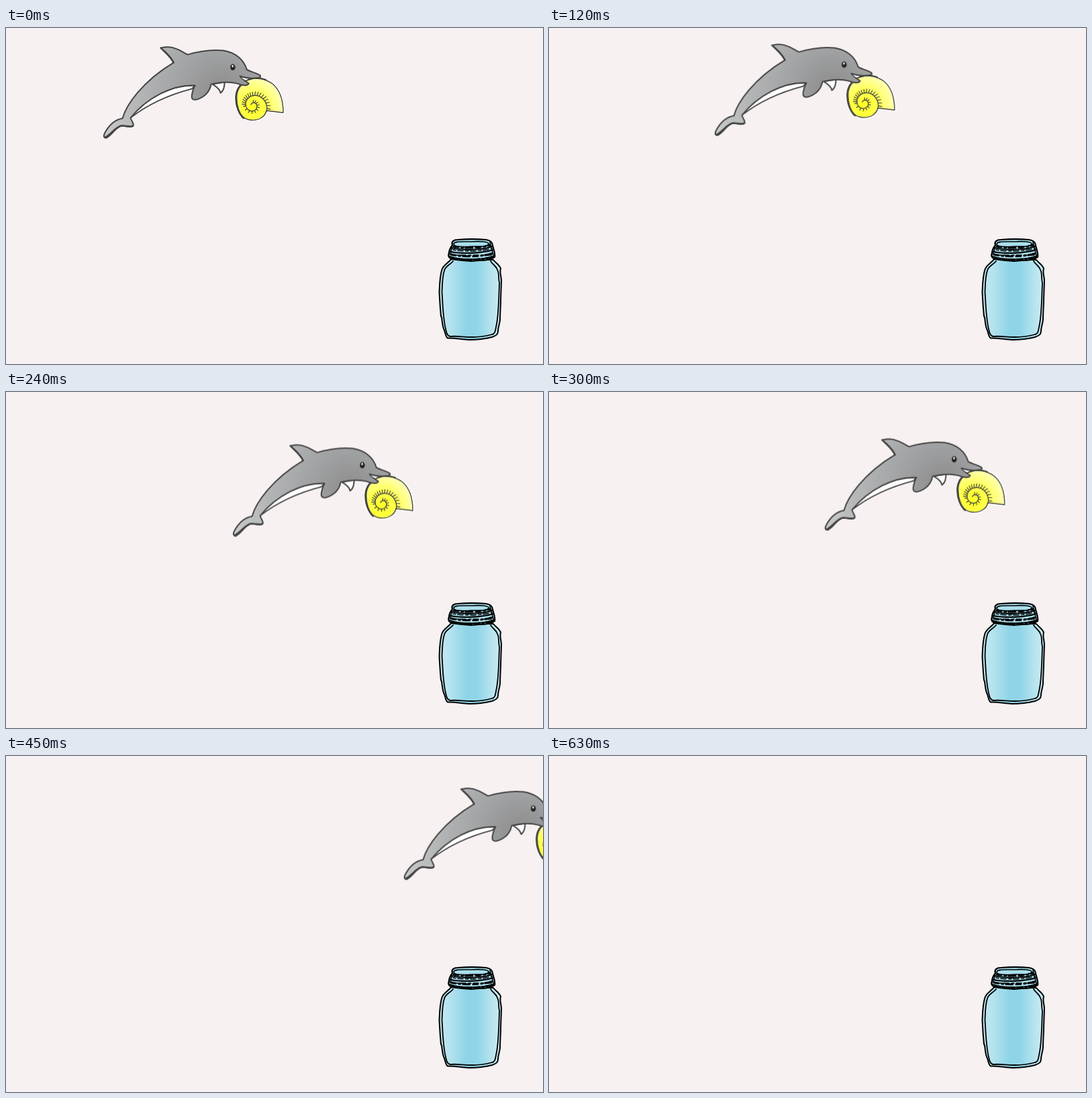
An HTML page for the animation above (690 ms loop, 800x500 px).

```html
<!DOCTYPE html>
<html lang="en">
<head>
<meta charset="utf-8">
<title>Dolphin and jar</title>
<style>
  html, body { margin: 0; width: 100%; height: 100%; overflow: hidden; background: #f7f1f1; }
  svg { display: block; width: 800px; height: 500px; }
  path, ellipse { stroke-linecap: round; stroke-linejoin: round; }
  .line { fill: none; }
  #swimmer { animation: swim 690ms infinite; }

  /* Three straight legs, one step every 30 ms, then a short pause */
  @keyframes swim {
    0%       { transform: translate(0, 0); animation-timing-function: steps(3, end); }
    13.0434% { transform: translate(79px, -17.5px); animation-timing-function: steps(5, end); }
    34.7826% { transform: translate(193px, 50.5px); animation-timing-function: steps(13, end); }
    91.3043%, 100% { transform: translate(666px, -6.5px); }
  }
</style>
</head>
<body>
<svg viewBox="0 0 800 500">
  <defs>
    <radialGradient id="skin" gradientUnits="userSpaceOnUse" cx="322" cy="98" r="190">
      <stop offset="0" stop-color="#8b8b8c"/>
      <stop offset=".3" stop-color="#9fa0a1"/>
      <stop offset=".6" stop-color="#b1b2b3"/>
      <stop offset="1" stop-color="#c9ccca"/>
    </radialGradient>
    <radialGradient id="shellFill" gradientUnits="userSpaceOnUse" cx="366" cy="120" r="56">
      <stop offset="0" stop-color="#ffff24"/>
      <stop offset=".4" stop-color="#ffff50"/>
      <stop offset=".75" stop-color="#ffffa0"/>
      <stop offset="1" stop-color="#ffffdc"/>
    </radialGradient>
    <linearGradient id="glass" gradientUnits="userSpaceOnUse" x1="647" y1="0" x2="738" y2="0">
      <stop offset="0" stop-color="#c4e8f1"/>
      <stop offset=".15" stop-color="#b5e3ee"/>
      <stop offset=".42" stop-color="#90d5e7"/>
      <stop offset=".6" stop-color="#90d5e7"/>
      <stop offset=".88" stop-color="#bde6f0"/>
      <stop offset="1" stop-color="#cbebf2"/>
    </linearGradient>
  </defs>

  <g id="jar" stroke="#000">
    <path fill="url(#glass)" stroke-width="2" d="M663 344 C660 349 650 353 649 361 C646 372 646 382 645.500 394 L647 418 C648 424 647 428 649 431 C650 437 650 444 653 450 C655 455 655 460 658 461.500 C667 461 677 463 690 464 C702 464 716 462 724 460 C730 458 733 456 733 451 C733 444 736 440 736 433 C736 423 737 414 737 404 L738 376 C738 370 735 364 737 358 C735 352 730 350 726 345 Z"/>
    <path class="line" stroke-width="1.800" d="M666 347 C662 352 654 355 653 361 C650 370 650 379 649.500 393 L651 418 C652 430 653 440 655 448 C656 453 657 458 662 459 C675 458 680 460 694 460 C707 460 717 458 724 456 C729 455 729 450 730 445 C733 433 733 422 734 407 L735 379 C733 371 735 364 732 360 C731 355 725 352 722 347"/>
    <path fill="#a9dfec" stroke-width="2.200" d="M665 323 C663 318 667 315 673 315 C686 314 703 314 715 315 C722 316 725 319 725 324 C727 331 729 336 728 341 C723 345 714 346 704 346 C691 348 677 346 666 344 C660 343 658 340 660 335 C660 330 662 327 665 323 Z"/>
    <path class="line" stroke-width="1.600" d="M667 322 C667 317 678 318 694 318 C706 317 719 318 719 321 C718 326 706 325 694 325 C682 326 668 326 667 322 Z M664 325 C665 330 662 332 662 337 M721 319 C723 328 724 331 726 338"/>
    <path class="line" stroke-width="2.200" d="M664 327 C679 331 709 331 724 325 M662 333 C678 336 707 336 726 330 M661 340 C678 346 708 346 728 339"/>
    <path class="line" stroke-width="3" stroke-dasharray="7 5 2 4 10 5" d="M667 325 C682 328 706 328 721 323 M663 337 C681 341 708 341 726 335 M665 343 C681 346 709 345 727 341"/>
    <path class="line" stroke-width="1.500" stroke-dasharray="4 3 8 4" d="M666 330 C681 333 706 333 724 328 M670 338 L724 338"/>
  </g>

  <g id="swimmer" stroke="#444" stroke-width="2">
    <g id="shell">
      <path fill="url(#shellFill)" stroke="#fff" stroke-width="5" d="M361 77 C371 73 386 75 397 83 C408 92 413 107 413 126 L388 123 C386 132 377 138 365 137 C351 136 342 122 342 104 C342 91 350 82 361 77 Z"/>
      <path fill="url(#shellFill)" stroke-width="1.400" d="M361 77 C371 73 386 75 397 83 C408 92 413 107 413 126 L388 123 C386 132 377 138 365 137 C351 136 342 122 342 104 C342 91 350 82 361 77 Z"/>
      <path class="line" stroke-width="2.800" d="M357 80 C347 85 343 94 343 104 C343 116 347 128 354 134"/>
      <path class="line" stroke-width="2" d="M361 77 C370 74 380 74 387 77"/>
      <path class="line" id="whorl" stroke-width="1.300"/>
      <path class="line" id="ribs" stroke-width="1.200"/>
    </g>

    <g id="dolphin" transform="translate(-.4 -.4)">
      <path fill="#fff" d="M308 84 C313 87 319 91 320 97 C325 94 326 88 326 81 Z"/>
      <path fill="#fff" stroke-width="1.700" d="M186 134 C207 106 245 85 282 86 L277 91 C246 99 213 113 186 134 Z"/>
      <path fill="url(#skin)" d="M231 30 C239 28 247 28 253 31 C260 33 264 37 271 40 C288 35 306 32 324 34 C343 37 355 48 359 62 C364 66 372 66 379 71 C381 74 377 75 372 75 C365 76 357 74 349 72 C353 77 358 80 362 83 C361 87 352 86 345 83 C334 80 319 81 306 84 C304 95 297 103 284 107 C277 108 276 104 278 97 C279 92 280 89 282 86 C248 84 210 105 186 134 C187 139 191 141 190 146 C187 150 178 145 172 146 C163 149 159 159 150 164 C146 164 145 161 148 156 C153 147 161 137 174 135 C179 116 203 80 250 52 C246 43 239 38 231 30 Z"/>
      <path class="line" stroke-width="2.600" d="M231 30 C239 38 246 43 250 52 M148 163 C156 160 163 148 172 146 C178 145 186 149 189 146"/>
      <path fill="#fff" stroke-width="1.300" d="M349 72 C354 75 359 75 364 75 L358 79 C354 78 351 75 349 72 Z"/>
      <ellipse cx="338.3" cy="58.8" rx="3.400" ry="4.400" fill="#222" stroke-width="1"/>
      <ellipse cx="338" cy="57.200" rx="1.200" ry="1.700" fill="#fff" stroke="none"/>
    </g>
  </g>
</svg>
<script>
  // Logarithmic spiral of the shell, with short ribs pointing outwards
  const point = (turn, extra = 0) => {
    const r = 22 * Math.exp(-0.2 * turn) + extra;
    const a = 0.4 - turn;
    return (368 + r * Math.cos(a)).toFixed(2) + ' ' + (115.5 + r * Math.sin(a)).toFixed(2);
  };

  const whorl = [];
  for (let t = 0; t <= 9.4; t += 0.1) whorl.push(point(t));
  document.getElementById('whorl').setAttribute('d', 'M' + whorl.join('L'));

  let ribs = '';
  for (let t = 0.2; t < 8.6; t += t < 3.6 ? 0.2 : 0.46) {
    ribs += 'M' + point(t) + 'L' + point(t, t < 3.6 ? 5.5 : 3.6);
  }
  document.getElementById('ribs').setAttribute('d', ribs);
</script>
</body>
</html>
```
